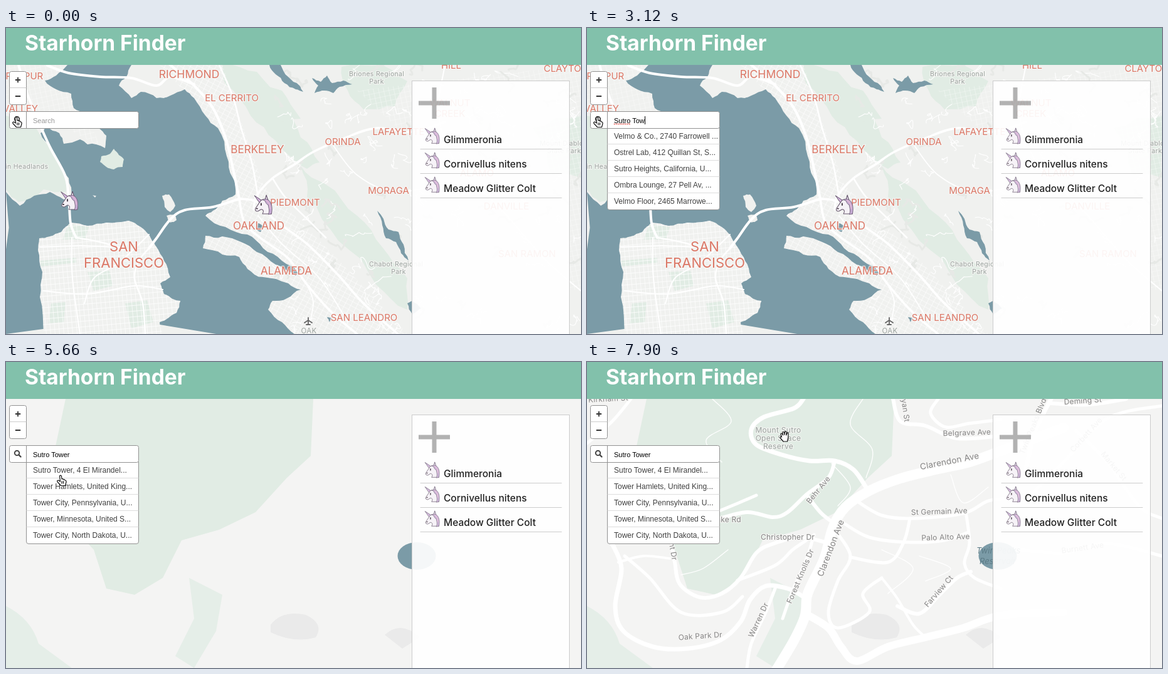
Animation of 917 by 489 pixels, one loop 8000 ms. Source, as an HTML page:

```html
<!DOCTYPE html>
<html lang="en">
<head>
<meta charset="utf-8">
<title>Starhorn Finder</title>
<style>
html, body { margin: 0; width: 100%; height: 100%; overflow: hidden; background: #f3f3f2; }
svg { display: block; width: 917px; height: 489px; font-family: Inter, sans-serif; }
path, line { stroke-linejoin: round; stroke-linecap: round; }
.label { text-anchor: middle; paint-order: stroke; stroke: #f7f6f4; stroke-width: 2.5px; stroke-opacity: .75; }
.city { fill: #db7766; }
.park { fill: #9ba39f; letter-spacing: .3px; }
.street { fill: #858585; letter-spacing: .2px; }
.water { fill: #7b9ba7; }
.green { fill: #e1ece4; }
.road { fill: none; stroke: #fff; }
.ui { font-family: "Liberation Sans", Arial, sans-serif; }
.box { fill: #fff; stroke: #929292; }
.rule { stroke: #ddd; }
.cursor { fill: #fff; stroke: #111; stroke-width: 1.2px; }
</style>
</head>
<body>
<svg viewBox="0 0 917 489">
  <defs>
    <pattern id="gridA" width="7" height="9" patternUnits="userSpaceOnUse" patternTransform="rotate(-5)">
      <path class="road" d="M0 0H7M0 0V9" stroke-width="1.3"/>
    </pattern>
    <pattern id="gridB" width="9" height="7" patternUnits="userSpaceOnUse" patternTransform="rotate(28)">
      <path class="road" d="M0 0H9M0 0V7" stroke-width="1.2"/>
    </pattern>
    <pattern id="gridC" width="8" height="8" patternUnits="userSpaceOnUse" patternTransform="rotate(-12)">
      <path class="road" d="M0 0H8M0 0V8" stroke-width="1.2"/>
    </pattern>
    <symbol id="pony" viewBox="0 0 28 32">
      <path d="M17 8L19 1L22 10Z" fill="#e9dfee" stroke="#5a4b63"/>
      <path d="M1 2L13 10L9 13Z" fill="#d3b3dd" stroke="#5a4b63" stroke-width=".9"/>
      <path d="M11 9C17 6 25 9 26 18L27 30H13C16 26 14 23 11 23L6 26Q1 26 2 22L8 13Z" fill="#f5f1f6" stroke="#67586d"/>
      <path d="M13 8C24 4 30 15 27 30L22 31C25 24 22 20 22 16C20 16 18 13 17 10Z" fill="#c5aad3" stroke="#67586d" stroke-width=".8"/>
      <path d="M19 9Q25 13 25 22" fill="none" stroke="#e6b9d6" stroke-width="1.5"/>
      <path d="M11 14v2.5M4 22h1" stroke="#40333f" stroke-width="1.8"/>
    </symbol>
  </defs>

  <g id="bay">
    <rect y="59" width="917" height="430" fill="#f0f1ef"/>
    <g id="bayGreen"></g>
    <path d="M245 59L345 59L375 150L410 250L520 360L640 489H430L300 330L330 150Z" fill="url(#gridB)"/>
    <path d="M0 59H100L150 190L80 150L0 140Z" fill="url(#gridC)" opacity=".6"/>
    <path d="M560 100L917 59V420L760 400L700 230Z" fill="url(#gridC)" opacity=".6"/>
    <g id="hills"></g>
    <g id="bayWater"></g>
    <g id="bayRoads"></g>
    <g id="bayText"></g>
    <path d="M482 463V474M482 467L476 471M482 467L488 471M479 474H485" stroke="#666" stroke-width="1.8"/>
    <use href="#pony" x="87" y="260" width="28" height="32"/>
    <use href="#pony" x="395" y="266" width="30" height="33"/>
  </g>

  <g id="town">
    <rect y="59" width="917" height="430" fill="#f4f4f3"/>
    <path class="green" d="M95 59H490L486 150L448 185L398 240L340 268L280 285L250 345L205 372L160 362L140 300L60 215L80 130Z"/>
    <path class="green" d="M0 390Q40 410 52 450L105 489H0ZM292 345L345 372L335 430L300 489L270 470L300 410Z" opacity=".75"/>
    <path d="M422 420Q440 396 478 404Q508 418 494 440Q460 450 422 432ZM604 436Q630 412 660 440L632 458Z" fill="#eaeaea"/>
    <ellipse class="water" cx="655" cy="310" rx="30.500" ry="22"/>
    <g id="townRoads"></g>
    <g id="townText"></g>
  </g>

  <rect width="917" height="59" fill="#82c1ab"/>
  <text x="30" y="35.500" font-size="33.500" font-weight="700" fill="#fff">Starhorn Finder</text>

  <rect x="647.500" y="84.500" width="251" height="420" fill="#fff" fill-opacity=".92" stroke="#ccc"/>
  <path d="M679.500 95h7v21.500H708v7H686.500V145h-7V123.500H658v-7h21.500z" fill="#000" fill-opacity=".3"/>
  <g id="herd"></g>

  <g class="ui">
    <rect class="box" x="5.500" y="69.500" width="27" height="53" rx="3"/>
    <path d="M6 95.500H32" stroke="#ccc"/>
    <path d="M15.500 83H22.500M19 79.500V86.500M15.500 109H22.500" stroke="#333" stroke-width="1.8"/>
    <path id="list" class="box" d="M32.500 160V287Q32.500 290.500 36 290.500H208Q211.500 290.500 211.500 287V160Z"/>
    <rect class="box" x="5.500" y="133.500" width="206" height="27" rx="3"/>
    <path d="M32.500 134V160" stroke="#929292"/>
    <circle cx="17.500" cy="145.500" r="3.700" fill="none" stroke="#444" stroke-width="2"/>
    <path d="M20.500 148.500L23.500 151.500" stroke="#444" stroke-width="2.400"/>
    <g id="rows" font-size="12" fill="#404040"></g>
    <text id="query" x="43" y="152" font-size="11"></text>
    <path id="spell" d="M43.500 153.500H70" stroke="#e0352b" stroke-width="1.500" stroke-dasharray=".5 2.500"/>
    <rect id="caret" y="141" width="1" height="13"/>
  </g>

  <g id="pointer" class="cursor">
    <path id="point" d="M4.500 2Q6.500 0 7.500 2.500L8 7Q10 6 10.500 8Q12.500 7 13 9Q15.500 9 15 12L13.500 17.500H6.500L1 11.500Q0 9 2.500 9L5.500 11ZM8 10.500V14M10.500 10.500V14"/>
    <path id="open" d="M3.500 10L2 5Q3 3 4.500 5L5.500 7L5 2.500Q6.500 .500 7.500 2.500L8 6.500L8.500 1.500Q10 0 11 2L10.800 7L12.500 3Q14.500 2.500 14 5L13.800 11L12.500 17H6L1 11Q1 8.500 3.500 10Z"/>
    <path id="arrow" d="M0 0L10 10H6L4 15Z" fill="#111"/>
  </g>
</svg>
<script>
const $ = id => document.getElementById(id);
const add = (id, markup) => $(id).insertAdjacentHTML('beforeend', markup);

let seed = 41;
const rand = () => (seed = (seed * 16807) % 2147483647) / 2147483647;

// Roughens a closed outline by midpoint displacement.
function shore(text, rough = .1) {
  let pts = text.split(' ').map(p => p.split(',').map(Number));
  for (let pass = 0; pass < 2; pass++) {
    pts = pts.flatMap(([x, y], i) => {
      const [u, v] = pts[(i + 1) % pts.length];
      const k = (rand() - .5) * 2 * rough;
      return [[x, y], [(x + u) / 2 + (v - y) * k, (y + v) / 2 - (u - x) * k]];
    });
  }
  return 'M' + pts.map(p => p.map(n => n.toFixed(1)).join(' ')).join('L') + 'Z';
}
const area = (id, cls, pts, extra = '') => add(id, `<path class="${cls}" d="${shore(pts)}" ${extra}/>`);

// Draws a smooth road through the given points.
function road(id, width, text) {
  const p = text.split(' ').map(s => s.split(',').map(Number));
  let d = 'M' + p[0];
  for (let i = 0; i < p.length - 1; i++) {
    const a = p[i - 1] || p[i], b = p[i], c = p[i + 1], e = p[i + 2] || c;
    const near = [0, 1].map(k => b[k] + (c[k] - a[k]) / 6);
    const far = [0, 1].map(k => c[k] - (e[k] - b[k]) / 6);
    d += `C${near} ${far} ${c}`;
  }
  add(id, `<path class="road" stroke-width="${width}" d="${d}"/>`);
}
const label = (id, cls, text, x, y, size, turn = 0) => add(id,
  `<text class="label ${cls}" font-size="${size}" transform="translate(${x} ${y}) rotate(${turn})">${text}</text>`);

// Bay map
[
  '0,140 40,150 70,190 90,225 96,262 60,258 20,278 0,258',
  '345,59 400,70 440,120 470,175 500,215 480,225 430,180 390,140 350,90',
  '535,62 600,59 640,85 620,125 570,130 545,100',
  '470,220 510,250 560,300 600,350 640,400 640,450 590,410 530,340 480,270',
  '840,160 917,140 917,240 870,235',
  '400,95 440,100 470,145 440,150'
].forEach(p => area('bayGreen', 'green', p));

for (let i = 0; i < 150; i++) {
  let x = 420 + rand() * 490, y = 65 + rand() * 420, d = `M${x | 0} ${y | 0}`;
  for (let j = 0; j < 4; j++) d += `q${(rand() * 14 - 5).toFixed(1)} ${(rand() * 14 - 7).toFixed(1)} ${(rand() * 22 - 8).toFixed(1)} ${(rand() * 22 - 11).toFixed(1)}`;
  add('hills', `<path d="${d}" fill="none" stroke="${i % 3 ? '#fff' : '#e7e9e6'}" stroke-width="${i % 3 ? 1.1 : 3}"/>`);
}

area('bayWater', 'water', '98,59 200,59 192,78 180,92 200,112 215,102 240,112 262,108 285,98 300,112 318,140 338,160 352,205 362,240 366,266 345,276 330,292 318,300 350,318 385,330 410,352 440,372 470,385 462,396 430,378 400,358 375,342 345,333 318,332 314,352 345,362 372,366 385,385 410,398 450,408 470,418 448,432 425,436 418,450 440,470 460,489 0,489 0,262 22,284 45,268 70,262 92,274 104,270 100,240 84,215 72,190 55,168 64,158 85,168 92,185 118,178 130,186 158,192 160,172 148,160 125,140 108,128 104,105 80,98 62,84 80,76');
[
  '420,59 438,59 450,78 468,92 474,102 462,98 444,88 430,74',
  '488,80 502,86 512,76 520,88 538,84 552,90 532,94 522,104 508,100 492,104 498,92',
  '592,292 602,305 610,322 626,326 634,346 642,372 630,360 622,342 606,336 600,315',
  '640,440 648,436 662,448 648,458',
  '402,312 409,316 406,326 400,322',
  '512,462 520,464 516,470'
].forEach(p => area('bayWater', 'water', p));

const city = shore('104,311 130,316 160,311 195,308 215,318 232,338 240,350 252,372 262,398 246,408 252,425 278,436 272,455 245,470 250,489 60,489 54,430 58,390 51,355 53,336 70,333 88,326', .07);
add('bayWater', `<path d="${city}" fill="#f0f1ef"/>
  <path class="green" d="M100 313L132 318L126 338L90 338ZM54 372L112 367V375L56 381ZM130 390L165 388L170 412L140 420ZM190 440L225 435L235 470L200 480ZM72 440L95 438L92 470L68 472Z"/>
  <path d="${city}" fill="url(#gridA)"/>`);
area('bayWater', 'green', '152,205 166,201 172,193 180,203 188,210 186,222 172,226 160,222 150,214');
['249,268 260,266 270,284 262,294 253,286', '256,300 268,298 272,307 262,311', '138,267 144,268 142,271'].forEach(p =>
  area('bayWater', '', p, 'fill="#f0f1ef"'));

[
  [4, '20,59 32,100 50,145 70,190 94,235 100,270 103,312 112,335'],
  [4, '66,60 100,72 150,78 200,80 240,92 262,78 300,90'],
  [4, '228,352 240,336 262,306 285,291 330,286 372,273'],
  [4, '262,59 300,92 330,128 350,175 362,225 372,273'],
  [3.5, '372,273 380,310 405,335 450,368 480,410 520,455 560,489'],
  [3.5, '372,273 400,278 430,308 480,345 530,395 570,440 625,489'],
  [3.5, '395,290 400,268 425,240 460,218 490,198 540,176 590,160 648,166 700,150'],
  [2.5, '340,59 362,110 375,160 392,215 402,270'],
  [2.5, '425,240 445,270 480,305 510,335'],
  [2.5, '228,352 212,372 205,400 218,440 222,489'],
  [2.5, '112,335 150,342 195,355'],
  [2, '105,335 106,400 118,489'],
  [2, '228,330 180,375 140,400 125,440'],
  [2, '54,350 120,348 170,350'],
  [2, '60,420 130,425 205,412 250,418'],
  [2, '700,59 690,140 720,220 790,290 860,370 917,420'],
  [1.8, '402,300 440,345 500,400 545,470'],
  [1.8, '480,410 490,440 480,489'],
  [1.8, '520,185 560,235 620,262 690,250']
].forEach(r => road('bayRoads', ...r));

[
  ['RICHMOND', 292, 80, 17.5], ['EL CERRITO', 360, 116.5, 15], ['BERKELEY', 401, 199.5, 17],
  ['ORINDA', 537, 187, 15], ['LAFAYETTE', 626, 171, 15], ['MORAGA', 610, 265, 15],
  ['PIEDMONT', 461, 284, 15], ['OAKLAND', 403, 321.5, 17], ['ALAMEDA', 447, 394, 17],
  ['SAN LEANDRO', 571, 468, 15], ['SAN', 188, 357, 22], ['FRANCISCO', 188, 383, 22],
  ['WALNUT', 708, 125, 15], ['CREEK', 708, 142, 15], ['ALAMO', 751, 237, 15],
  ['DANVILLE', 798, 290, 15], ['SAN RAMON', 831, 366, 15], ['HILL', 710, 65, 15],
  ['CLAYTON', 893, 70, 15], ['LARKSPUR', 20, 82, 15], ['VALLEY', 23, 134, 15]
].forEach(l => label('bayText', 'city', ...l));
[
  ['Briones Regional', 591, 77, 10.5], ['Park', 591, 89, 10.5], ['Chabot Regional', 622, 381, 10.5],
  ['Park', 626, 393, 10.5], ['Marin Headlands', 23, 225, 10.5], ['Mount Diablo', 886, 188, 10.5],
  ['State Park', 890, 200, 10.5], ['OAK', 483, 488, 11.5]
].forEach(l => label('bayText', 'park', ...l));

// Neighbourhood map
[
  [16, '300,495 330,445 348,405 352,370 378,315 392,265 412,232 450,206 500,186 560,171 610,160 660,142 760,105'],
  [12, '348,402 385,425 405,455 430,478 480,455 540,440 600,425 660,405 760,400'],
  [7, '345,59 330,74 282,88 262,108 270,132 310,148 355,158 395,158 425,172 446,202'],
  [6, '395,158 385,185 350,212 320,240 296,248 255,240 205,252'],
  [5, '270,213 240,226 211,238'],
  [6, '350,212 372,240 390,255'],
  [7, '40,290 55,330 45,390 58,430 105,455 160,458 212,445 245,415 260,380 285,358 320,362 345,375'],
  [6, '134,285 140,320 148,355 180,376 215,370 245,345 270,305 298,290 340,280 380,288'],
  [5, '60,310 100,345 150,400 215,400 248,375'],
  [5, '240,349 300,325 328,300 350,285'],
  [5, '362,276 350,315 328,365 312,410'],
  [5, '300,362 285,400 262,450 255,489'],
  [5, '0,130 40,95 70,59'],
  [4, '50,320 90,310 132,314'],
  [6, '488,59 500,95 540,102 590,122 660,118'],
  [5, '560,59 548,82 572,104 610,98 660,92'],
  [5, '430,222 470,245 520,250 600,242 640,222 680,218'],
  [5, '410,258 450,280 510,288 570,285 608,272'],
  [5, '605,245 610,290 602,322 618,345 660,362'],
  [6, '495,390 530,402 562,372 590,345 612,335'],
  [5, '395,268 420,310 400,350 385,400 400,425 450,400 440,370 470,345'],
  [4, '470,345 495,378 520,420 540,440'],
  [5, '515,250 505,288 480,320 420,312'],
  [7, '700,170 715,110 740,59'],
  [6, '740,66 800,68 860,59'],
  [5, '700,220 760,160 830,90 917,70'],
  [5, '780,110 830,160 880,230 917,250'],
  [5, '690,300 760,305 830,290 917,310']
].forEach(r => road('townRoads', ...r));
[
  '390,162 420,200 400,230', '440,59 420,100 455,140 445,185', '200,59 230,95 190,125 215,160',
  '150,340 185,330 225,300', '580,180 600,225 640,200', '470,300 520,330 480,370', '530,310 580,330 540,350'
].forEach(p => road('townRoads', 1.3, p));

[
  ['Clarendon Ave', 579, 163, 13.5, -11], ['Clarendon Ave', 393, 299, 13.5, -69], ['Belgrave Ave', 606, 117, 12, -2],
  ['St Germain Ave', 562, 243, 12, -2], ['Palo Alto Ave', 572, 284, 12, -2], ['Farview Ct', 564, 369, 12, -49],
  ['Behr Ave', 372, 207, 12, -51], ['Christopher Dr', 320, 284, 12, 0], ['Forest Knolls Dr', 344, 344, 12, -67],
  ['Warren Dr', 277, 414, 12, -65], ['Oak Park Dr', 181, 442, 12, -4], ['Medical Ctr Lake Rd', 187, 256, 12, 0],
  ['Crestmont Dr', 129, 279, 12, 80], ['Kirkham St', 34, 63, 12, -3], ['Stanyan St', 502, 65, 12, 82],
  ['Deming St', 791, 66, 12, -4], ['Twin Peaks Blvd', 715, 104, 12, -68], ['Corbett Ave', 799, 119, 12, -48],
  ['Market St', 837, 169, 12, 50], ['Burnett Ave', 791, 301, 12, -8]
].forEach(l => label('townText', 'street', ...l));
[['Mount Sutro', 305, 113, 12], ['Open Space', 305, 126, 12], ['Reserve', 305, 139, 12]].forEach(l =>
  label('townText', 'park', ...l));
add('townText', '<g font-style="italic" font-size="13" fill="#5d7c87"><text x="621" y="306">Twin Peaks</text><text x="626" y="323">Reservoir</text></g>');

['Glimmeronia', 'Cornivellus nitens', 'Meadow Glitter Colt'].forEach((name, i) => {
  const y = 184 + 39 * i;
  add('herd', `<use href="#pony" x="667" y="${y - 25}" width="25" height="27" opacity=".85"/>
    <text x="698" y="${y}" font-size="15.500" font-weight="500" fill="#222">${name}</text>
    <path d="M661 ${y + 9.5}H886" stroke="#ccc"/>`);
});

// Search suggestions
const lists = [
  [],
  ['Sulawesi Selatan, Indonesia', 'Sumatera Utara, Indonesia', 'Sulawesi Utara, Indonesia', 'Sulawesi Tengah, Indonesia', 'Suffolk, United Kingdom'],
  ['Velmo & Co., 2740 Farrowell ...', 'Ostrel Lab, 412 Quillan St, S...', 'Sutro Heights, California, U...', 'Ombra Lounge, 27 Pell Av, ...', 'Velmo Floor, 2465 Marrowe...'],
  ['Sutro Tower, 4 El Mirandel...', 'Velmo Shaft Company, 274...', 'Bel Orvin Court Residenc...', 'Velmo Quarry Rd, Dayton, N...', 'Turkey'],
  ['Sutro Tower, 4 El Mirandel...', 'Tower Hamlets, United King...', 'Tower City, Pennsylvania, U...', 'Tower, Minnesota, United S...', 'Tower City, North Dakota, U...']
];
for (let i = 0; i < 5; i++) {
  add('rows', `<text x="43" y="${177 + 26 * i}"></text>`);
  if (i) add('rows', `<path class="rule" d="M33 ${159.5 + 26 * i}H211"/>`);
}
const rows = [...$('rows').querySelectorAll('text')];

// Timelines: each value holds from its time on
const typed = [[0, 0], [890, 1], [1190, 2], [1340, 3], [1490, 4], [1640, 5], [2090, 6], [2240, 7], [2390, 8], [3120, 9], [3270, 10], [3420, 11]];
const listed = [[0, 0], [1340, 1], [2240, 2], [3420, 3], [4770, 4]];
const zoom = [[0, 0], [5660, 1], [5810, 2], [5960, 3]];
const moves = [
  [0, 'point', 10, 141], [4020, 'point', 8, 147], [4170, 'point', 3, 156], [4320, 'arrow', -3, 164],
  [4470, 'arrow', -8, 166], [4620, 'arrow', -30, 170], [4770, 'point', 30, 181], [4920, 'point', 82, 182],
  [5220, 'point', 81, 180], [6860, 'point', 98, 178], [7010, 'point', 150, 163], [7160, 'open', 228, 139],
  [7310, 'open', 312, 119], [7460, 'open', 354, 111], [7610, 'open', 342, 110], [7750, 'open', 319, 110], [7900, 'open', 307, 110]
];
const at = (track, t) => track.findLast(k => k[0] <= t).slice(1);
const show = (id, on) => { $(id).style.display = on ? '' : 'none'; };

let shownList = -1, shownText;
function draw() {
  const t = performance.now() % 8000;
  const [count] = at(typed, t), [list] = at(listed, t), [level] = at(zoom, t), [shape, x, y] = at(moves, t);
  const text = count ? 'Sutro Tower'.slice(0, count) : 'Search';
  if (text !== shownText) {
    $('query').textContent = shownText = text;
    $('query').setAttribute('fill', count ? '#000' : '#999');
    const width = $('query').getComputedTextLength() + (text.endsWith(' ') ? 3 : 0);
    $('caret').setAttribute('x', count ? Math.round(43 + width) : 43);
  }
  if (list !== shownList) {
    rows.forEach((row, i) => { row.textContent = lists[list][i] || ''; });
    shownList = list;
  }
  show('list', list);
  show('rows', list);
  show('caret', t >= 450 && t < 5070);
  show('spell', t >= 2090 && t < 4920);
  show('bay', !level);
  show('town', level);
  show('townRoads', level > 1);
  show('townText', level > 2);
  ['point', 'open', 'arrow'].forEach(id => show(id, id === shape));
  $('pointer').setAttribute('transform', `translate(${x} ${y})`);
  requestAnimationFrame(draw);
}
draw();
</script>
</body>
</html>
```
